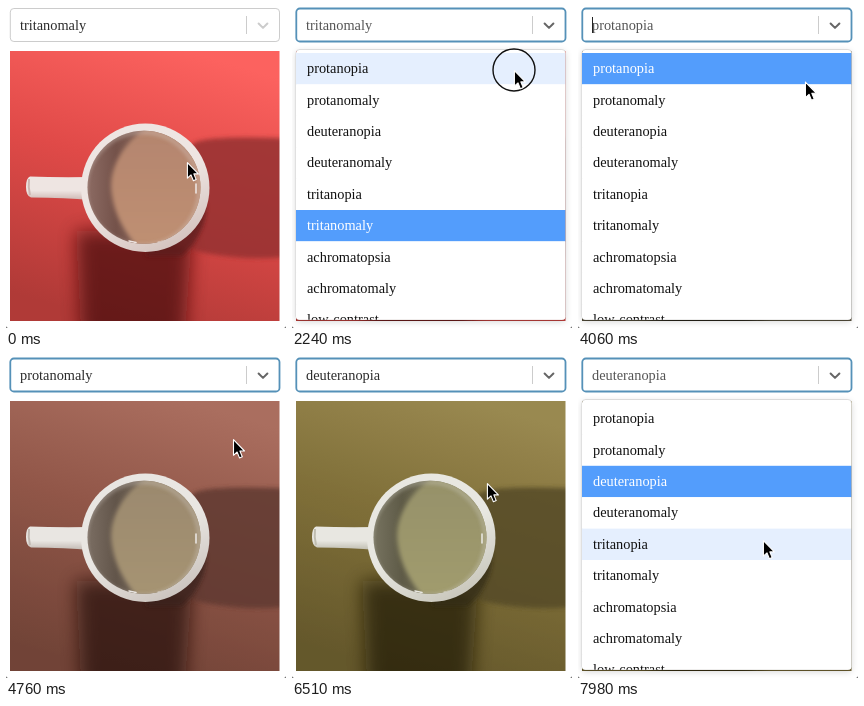
An HTML page for the animation above (8 s loop, 280 by 322 pixels).

```html
<!DOCTYPE html>
<html lang="en">
<head>
<meta charset="utf-8">
<title>Colour vision select</title>
<style>
html, body { margin: 0; width: 100%; height: 100%; overflow: hidden; background: #fff; }
svg { display: block; width: 280px; height: 322px; }
text { font: 14.35px "Liberation Serif", "Times New Roman", serif; fill: #111; }
.ctl { fill: #fff; stroke: #ccc; }
.focus .ctl { stroke: #5591b8; stroke-width: 1.8; }
.chev { fill: none; stroke: #ccc; stroke-width: 2; stroke-linecap: round; stroke-linejoin: round; }
.focus .chev { stroke: #666; }
#value { fill: #2b2b2b; }
.open #value { fill: #555; }
#menu, #caret { visibility: hidden; }
.open #menu { visibility: visible; }
#panel { filter: drop-shadow(0 2px 3px rgba(0,0,0,.16)); }
#rows rect { fill: #fff; }
#rows .hover rect { fill: #e5effe; }
#rows .chosen rect { fill: #539dfc; }
#rows .chosen text { fill: #fff; }
</style>
</head>
<body>
<svg id="stage" viewBox="0 0 280 322">
  <defs>
    <linearGradient id="table" x1=".66" y1="0" x2=".36" y2="1">
      <stop stop-color="#fc625f"/><stop offset=".45" stop-color="#e04a48"/><stop offset="1" stop-color="#b03a37"/>
    </linearGradient>
    <linearGradient id="china" x1=".25" y1="0" x2=".75" y2="1">
      <stop offset=".5" stop-color="#eee5e2"/><stop offset="1" stop-color="#d2c0bb"/>
    </linearGradient>
    <linearGradient id="grip" x1="0" y1="0" x2="0" y2="1">
      <stop offset=".6" stop-color="#eee5e2"/><stop offset="1" stop-color="#cdb7b2"/>
    </linearGradient>
    <linearGradient id="wall">
      <stop stop-color="#8d6c64"/><stop offset=".25" stop-color="#74524a"/><stop offset="1" stop-color="#b58e78"/>
    </linearGradient>
    <linearGradient id="milk" x1="0" y1="0" x2="0" y2="1">
      <stop stop-color="#b4856e"/><stop offset="1" stop-color="#bf9073"/>
    </linearGradient>
    <filter id="haze" x="-50%" y="-50%" width="200%" height="200%"><feGaussianBlur stdDeviation="9"/></filter>
    <filter id="edge" x="-10%" y="-10%" width="120%" height="120%"><feGaussianBlur stdDeviation="2"/></filter>
    <clipPath id="frame"><rect x="4" y="45" width="269.5" height="270"/></clipPath>
    <clipPath id="list"><rect x="4" y="43.5" width="269.5" height="270.3" rx="3.6"/></clipPath>
    <clipPath id="bowl"><circle cx="138" cy="181.3" r="56.5"/></clipPath>
    <filter id="vision" filterUnits="userSpaceOnUse" x="0" y="40" width="280" height="280" color-interpolation-filters="sRGB">
      <feColorMatrix id="matrix"/>
    </filter>
  </defs>
  <rect width="280" height="322" fill="#fff"/>
  <path d="M0 319.5Q0 322 2.5 322H0ZM280 319.5Q280 322 277.5 322H280Z" fill="#444"/>

  <g clip-path="url(#frame)"><g filter="url(#vision)">
    <rect x="4" y="45" width="270" height="270" fill="url(#table)"/>
    <path d="M70 225H186L178 340H76Z" fill="#4a1010" opacity=".72" filter="url(#haze)"/>
    <path d="M150 160L190 136Q210 129 290 133V250Q215 258 165 236Z" fill="#963230" opacity=".85" filter="url(#edge)"/>
    <path d="M165 150Q222 190 186 240L176 250H140Z" fill="#5c1a1a" opacity=".75" filter="url(#edge)"/>
    <path d="M24 170.5Q50 171.5 84 171V194Q60 191.5 25 191.5Q20 190 20 181T24 170.5Z" fill="url(#grip)"/>
    <path d="M23 173Q22 181 24 189" fill="none" stroke="#cdb7b2" stroke-width="2"/>
    <circle cx="139.3" cy="181.7" r="64.2" fill="url(#china)"/>
    <g clip-path="url(#bowl)">
      <rect x="80" y="120" width="120" height="120" fill="url(#wall)"/>
      <path d="M140 122C116 138 101 165 106 190Q110 216 132 242H205V122Z" fill="url(#milk)" filter="url(#edge)"/>
      <circle cx="136.5" cy="183" r="57" fill="none" stroke="#d8c8c1" stroke-width="3" opacity=".6" filter="url(#edge)"/>
      <path d="M190 178V187M123 235L130 236.5M152 236.5L158 235" fill="none" stroke="#eee5e2" stroke-width="1.6" stroke-linecap="round"/>
    </g>
  </g></g>

  <rect class="ctl" x="4.3" y="2.5" width="269.2" height="33" rx="3.6"/>
  <text id="value" x="14" y="24"></text>
  <path id="caret" d="M14.5 11V27" stroke="#222"/>
  <path d="M240.5 10V28" stroke="#ccc"/>
  <path class="chev" d="M252.6 17.5L257 21.9L261.4 17.5"/>

  <g id="menu">
    <rect id="panel" x="4" y="43.5" width="269.5" height="270.3" rx="3.6" fill="#fff" stroke="#000" stroke-opacity=".12"/>
    <g id="rows" clip-path="url(#list)"></g>
  </g>

  <circle id="ring" r="21" fill="none" stroke="#111" stroke-width="1.4"/>
  <path id="arrow" d="M.4 .6V16.2L4 12.9L6.4 18.8L9.2 17.6L6.8 11.9H11.4Z" stroke="#fff" stroke-width="1.1" stroke-linejoin="round"/>
</svg>
<script>
const $ = id => document.getElementById(id);
const LOOP = 8000, STEP = 70, TOP = 47, PITCH = 31.4, FOCUS = 630, HOME = 262;
const names = ['protanopia', 'protanomaly', 'deuteranopia', 'deuteranomaly', 'tritanopia',
  'tritanomaly', 'achromatopsia', 'achromatomaly', 'low-contrast'];

// The menu opens, the pointer leaves the chevron (at height y0) and arrives at x, y, where it picks.
const rounds = [
  { open: 1540, leave: 1960, arrive: 2170, pick: 2380, y0: 15, x: 222, y: 64, name: 'protanopia' },
  { open: 3430, leave: 3780, arrive: 4200, pick: 4480, y0: 15, x: 224, y: 88, name: 'protanomaly' },
  { open: 5250, leave: 5460, arrive: 6090, pick: 6440, y0: 28, x: 195, y: 127, name: 'deuteranopia' },
  { open: 7210, leave: 7420, arrive: 7980, pick: LOOP, y0: 26, x: 185, y: 184 }
];

// Red and green merge by share r in red and g in green; blue loses b of their difference.
const mix = (r, g, b) => [r, 1 - r, 0, 0, 0, g, 1 - g, 0, 0, 0, -b, b, 1, 0, 0, 0, 0, 0, 1, 0];
const visions = {
  tritanomaly: mix(1, 0, 0),
  protanopia: mix(.17, .12, 0),
  protanomaly: mix(.47, .08, 0),
  deuteranopia: mix(.36, .25, .1)
};

const clamp = k => Math.min(1, Math.max(0, k));
const lerp = (a, b, k) => a + (b - a) * k;
const easeOut = (k, p) => 1 - (1 - k) ** p;

const rows = names.map((name, i) => {
  const y = TOP + i * PITCH;
  $('rows').insertAdjacentHTML('beforeend',
    `<g><rect x="4" y="${y}" width="269.5" height="${PITCH}"/><text x="15" y="${y + 20.2}">${name}</text></g>`);
  return $('rows').lastElementChild;
});

// Quick swing out to the option, slow start on the way back to the chevron.
function pointer(t) {
  const i = rounds.findIndex(r => t < r.pick), now = rounds[i], last = rounds[i - 1];
  if (t >= now.leave) {
    const k = clamp((t - now.leave) / (now.arrive - now.leave));
    return [lerp(HOME, now.x, easeOut(k, 2.3)), lerp(now.y0, now.y, easeOut(k, 1.6))];
  }
  const k = last ? clamp((t - last.pick - 140) / 490) ** 2 : easeOut(clamp((t - 70) / 490), 1.6);
  const from = last || { x: 181, y: 156 };
  return [lerp(from.x, HOME, k), lerp(from.y, now.y0, k)];
}

const pressed = t => Math.abs(t - FOCUS) <= 70 ||
  rounds.some(r => t >= r.open - 70 && t < r.open + 140 || t >= r.pick - 140 && t < r.pick && r.name);

function draw(t) {
  const [x, y] = pointer(t);
  const open = rounds.find(r => t >= r.open && t < r.pick);
  const done = rounds.filter(r => t >= r.pick).pop();
  const value = done ? done.name : 'tritanomaly';
  const hover = Math.floor((y - TOP) / PITCH);

  $('stage').classList.toggle('focus', t >= FOCUS);
  $('stage').classList.toggle('open', !!open);
  $('value').textContent = value;
  $('matrix').setAttribute('values', visions[value].join(' '));
  $('caret').style.visibility = open && (t - open.open) % 1400 < 700 ? 'visible' : 'hidden';
  rows.forEach((row, i) => {
    row.classList.toggle('chosen', names[i] === value);
    row.classList.toggle('hover', i === hover);
  });

  for (const id of ['arrow', 'ring']) $(id).setAttribute('transform', `translate(${x} ${y})`);
  $('ring').style.visibility = pressed(t) ? 'visible' : 'hidden';
}

const start = performance.now();
function tick(now) {
  const t = Math.max(0, now - start) % LOOP;
  draw(Math.floor(t / STEP) * STEP);
  requestAnimationFrame(tick);
}
draw(0);
requestAnimationFrame(tick);
</script>
</body>
</html>
```
